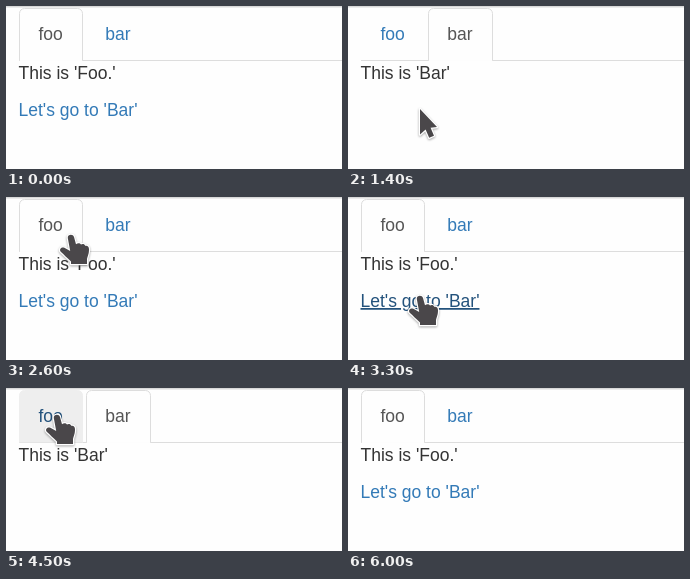
These frames come from a looping animation (336 by 163 pixels, 7200 ms). An HTML page:

```html
<!DOCTYPE html>
<html lang="en">
<head>
<meta charset="utf-8">
<title>Tabs</title>
<style>
  html, body { margin: 0; width: 100%; height: 100%; overflow: hidden; background: #fefefe; }
  svg { display: block; width: 336px; height: 163px; }
  text { font: 17.5px "Liberation Sans", Arial, sans-serif; fill: #333; }
  .link, .tab text { fill: #337ab7; }
  .link.hover { fill: #23527c; text-decoration: underline; }
  .tab path { fill: none; stroke: none; }
  .tab.hover path { fill: #eee; stroke: #eee; }
  .tab.hover text { fill: #23527c; }
  .tab.active path { fill: #fefefe; stroke: #ddd; }
  .tab.active text { fill: #555; }
  .tab .gap { display: none; }
  .tab.active .gap { display: inline; fill: #fefefe; }
  #cursor path { fill: #4a474a; stroke: #fff; stroke-width: 2.4; stroke-linejoin: round; paint-order: stroke; }
  #cursor { filter: drop-shadow(.6px 1px 1px rgba(0, 0, 0, .35)); }
</style>
</head>
<body>
<svg viewBox="0 0 336 163">
  <rect width="336" height="1" fill="#d8d8d8"/>
  <rect y="1" width="336" height="1" fill="#ececec"/>
  <rect x="13" y="54" width="323" height="1" fill="#ddd"/>
  <g class="tab" id="foo">
    <rect class="gap" x="14" y="54" width="62" height="1"/>
    <path d="M13.5 54.5V7.5a5 5 0 0 1 5-5H71.5a5 5 0 0 1 5 5V54.5"/>
    <text x="32.5" y="34">foo</text>
  </g>
  <g class="tab" id="bar">
    <rect class="gap" x="81" y="54" width="63" height="1"/>
    <path d="M80.5 54.5V7.5a5 5 0 0 1 5-5H139.5a5 5 0 0 1 5 5V54.5"/>
    <text x="99.2" y="34">bar</text>
  </g>
  <text id="body" x="12.5" y="73"></text>
  <text id="link" class="link" x="12.5" y="110">Let's go to 'Bar'</text>
  <g id="cursor">
    <path id="arrow" d="M0 0V25.5L5.6 20.6L9.2 28.8L14 26.7L10.6 18.8L17 18Z"/>
    <path id="hand" d="M-3.2 3C-3.6 -.6 2 -1.4 3 2L5 9.2C7 7.6 9 8 10 9.6C11.6 8.4 13.6 9 14.2 10.8C16.4 10.2 18 11.6 18 14.2C18 19 16.6 21 16 24V29H0V26.4C-4 23 -7 19.6 -10 17C-12.4 14.4 -9.8 11.4 -6.6 12.8L-.8 16Z"/>
  </g>
</svg>
<script>
  const LOOP = 7200;
  // [time, tab, hovered element, pointer, x, y]
  const steps = [
    [0, "foo", "", "", 0, 0],
    [400, "foo", "", "arrow", 78, 125],
    [500, "foo", "", "arrow", 76, 118],
    [600, "foo", "link", "hand", 74, 108],
    [700, "foo", "link", "hand", 73, 102],
    [1400, "bar", "", "arrow", 72, 103],
    [1800, "bar", "", "arrow", 98, 76],
    [1900, "bar", "", "arrow", 121, 42],
    [2000, "bar", "", "arrow", 107, 27],
    [2100, "bar", "", "arrow", 86, 31],
    [2200, "bar", "foo", "hand", 65, 38],
    [2600, "foo", "", "hand", 65, 38],
    [2900, "foo", "", "arrow", 62, 26],
    [3000, "foo", "", "arrow", 62, 38],
    [3100, "foo", "", "arrow", 65, 60],
    [3200, "foo", "", "arrow", 69, 82],
    [3300, "foo", "link", "hand", 72, 99],
    [3400, "foo", "link", "hand", 73, 106],
    [3900, "bar", "", "arrow", 72, 107],
    [4000, "bar", "", "arrow", 72, 106],
    [4200, "bar", "", "arrow", 61, 94],
    [4300, "bar", "", "arrow", 56, 66],
    [4400, "bar", "foo", "hand", 53, 42],
    [4500, "bar", "foo", "hand", 51, 27],
    [5100, "foo", "", "hand", 51, 27],
    [5500, "foo", "", "arrow", 46, 28],
    [5600, "foo", "", "arrow", 36, 31],
    [5700, "foo", "", "arrow", 25, 35],
    [5800, "foo", "", "arrow", 18, 37],
    [6000, "foo", "", "", 0, 0],
  ];

  const $ = id => document.getElementById(id);
  const show = (id, on) => $(id).style.display = on ? "" : "none";
  let last;

  function render(step) {
    const [, tab, hover, pointer, x, y] = step;
    for (const id of ["foo", "bar"]) $(id).classList.toggle("active", id === tab);
    for (const id of ["foo", "bar", "link"]) $(id).classList.toggle("hover", id === hover);
    $("body").textContent = tab === "foo" ? "This is 'Foo.'" : "This is 'Bar'";
    show("link", tab === "foo");
    for (const id of ["arrow", "hand"]) show(id, id === pointer);
    $("cursor").setAttribute("transform", `translate(${x} ${y})`);
  }

  function tick() {
    const t = performance.now() % LOOP;
    const step = steps.findLast(s => s[0] <= t);
    if (step !== last) render(last = step);
    requestAnimationFrame(tick);
  }
  tick();
</script>
</body>
</html>
```
